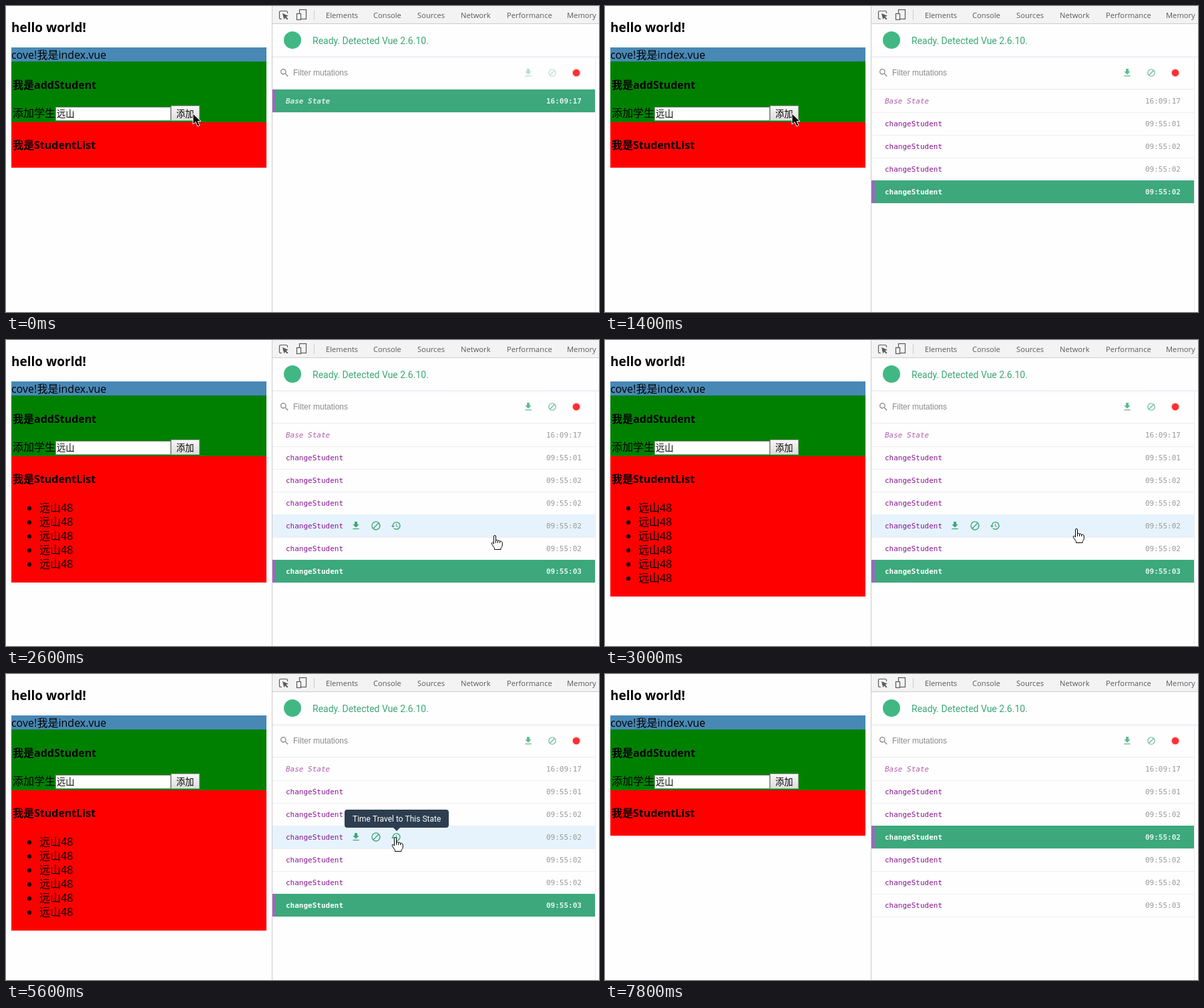
An HTML page with a canvas that plays this animation: 888 px wide and 458 px high, repeating every 8400 ms.

```html
<!DOCTYPE html>
<html lang="zh-CN">
<head>
<meta charset="utf-8">
<title>Mutation log</title>
<style>
html, body { margin: 0; width: 100%; height: 100%; overflow: hidden; background: #fefefe; }
canvas { display: block; }
</style>
</head>
<body>
<canvas id="stage" width="888" height="458"></canvas>
<script>
const ctx = document.getElementById('stage').getContext('2d');
const LOOP = 8400, STEP = 200;
const UI = '"Open Sans", "Noto Sans CJK SC", "Noto Sans CJK", sans-serif';
const MONO = '"DejaVu Sans Mono", monospace';
const ROBOTO = 'Roboto, sans-serif';
const GREEN = '#3ba776', ACTIVE = '#3ca87b', GRAY = '#5a5a5a';
const ROW_TOP = 125, ROW_H = 34, ROW_RIGHT = 882, PANEL = 399;
const STUDENT = '远山';

const TIMES = ['16:09:17', '09:55:01', '09:55:02', '09:55:02', '09:55:02', '09:55:02', '09:55:03'];
const COMMITS = [600, 1000, 1200, 1400, 1600, 2200];
const RENDERS = [1600, 2000, 2200, 2400, 2600, 3000];
const TOOLTIP_AT = 4000, TRAVEL_AT = 5800, LEAVE_AT = 6200, HAND_AT = 2400;
const CURSOR = [
  [2200, 280, 161], [2600, 732, 292], [2800, 732, 292], [3200, 680, 272],
  [3600, 597, 253], [4000, 583, 248], [4400, 583, 244]
];

// Material-style glyphs on a 24 unit grid
const ICONS = {
  download: 'M19 9h-4V3H9v6H5l7 7 7-7zM5 18v2h14v-2H5z',
  block: 'M12 2a10 10 0 1 0 0 20 10 10 0 0 0 0-20zM4 12a8 8 0 0 1 12.9-6.31L5.69 16.9A7.9 7.9 0 0 1 4 12zm8 8c-1.85 0-3.55-.63-4.9-1.69L18.31 7.1A8 8 0 0 1 12 20z',
  history: 'M13 3a9 9 0 0 0-9 9H1l3.89 3.89.07.14L9 12H6a7 7 0 1 1 2.06 4.94l-1.42 1.42A9 9 0 1 0 13 3zm-1 5v5l4.28 2.54.72-1.21-3.5-2.08V8H12z',
  search: 'M15.5 14h-.79l-.28-.27A6.47 6.47 0 0 0 16 9.5 6.5 6.5 0 1 0 9.5 16c1.61 0 3.09-.59 4.23-1.57l.27.28v.79l5 4.99L20.49 19zm-6 0a4.5 4.5 0 1 1 0-9 4.5 4.5 0 0 1 0 9z'
};
for (const name in ICONS) ICONS[name] = new Path2D(ICONS[name]);

const ARROW = new Path2D('M0 0V16L4 12.5 7 19 10 17.7 7.2 11.5H12Z');
const HAND = new Path2D('M-1.5 13V2Q-1.5 .5 0 .5T1.5 2V8Q3 6.5 4.5 8.3 6.2 7.2 7.5 9.2 10 8.3 11.3 11V15Q11 18 9 19.5V21.5H-.5V19.5L-4.8 13.2Q-5 11 -3.3 11.2Z');
const FINGERS = new Path2D('M1.5 8V12M4.5 8.3V12M7.5 9.2V12');
const INSPECT = new Path2D('M413 19.5H411.5Q409.5 19.5 409.5 17.5V9.5Q409.5 7.5 411.5 7.5H419.5Q421.5 7.5 421.5 9.5V11');
const POINTER = new Path2D('M414 11L423 14.8 419.4 16.1 422.5 19.3 421 20.6 418 17.5 416.3 20.3Z');

function rect(x, y, w, h, color) {
  ctx.fillStyle = color;
  ctx.fillRect(x, y, w, h);
}

function frame(x, y, w, h, color) {
  ctx.strokeStyle = color;
  ctx.lineWidth = 1;
  ctx.strokeRect(x + .5, y + .5, w - 1, h - 1);
}

function text(str, x, y, font, color = '#000') {
  ctx.font = font;
  ctx.fillStyle = color;
  ctx.fillText(str, x, y);
}

function disc(x, y, r, color) {
  ctx.fillStyle = color;
  ctx.beginPath();
  ctx.arc(x, y, r, 0, Math.PI * 2);
  ctx.fill();
}

function icon(name, x, y, color, size = 16) {
  ctx.save();
  ctx.translate(x - size / 2, y - size / 2);
  ctx.scale(size / 24, size / 24);
  ctx.fillStyle = color;
  ctx.fill(ICONS[name], 'evenodd');
  ctx.restore();
}

const countPast = (list, t) => list.filter(at => t >= at).length;

function cursorAt(t) {
  if (t >= LEAVE_AT) return null;
  const hand = t >= HAND_AT;
  const next = CURSOR.findIndex(key => key[0] > t);
  if (next === 0) return { x: CURSOR[0][1], y: CURSOR[0][2], hand };
  if (next < 0) {
    const [, x, y] = CURSOR[CURSOR.length - 1];
    return { x, y, hand };
  }
  const [t0, x0, y0] = CURSOR[next - 1], [t1, x1, y1] = CURSOR[next];
  const k = (t - t0) / (t1 - t0);
  return { x: Math.round(x0 + (x1 - x0) * k), y: Math.round(y0 + (y1 - y0) * k), hand };
}

function drawPage(items) {
  const body = `16px ${UI}`, bold = `bold 16px ${UI}`, control = `13.33px ${UI}`;
  text('hello world!', 8, 39, `bold 19px ${UI}`);
  rect(8, 62, 382, 21, '#4888b5');
  text('cove!', 8, 79, body);
  text('我是index.vue', 46.5, 79, body);

  rect(8, 83, 382, 91, '#008000');
  text('我是addStudent', 10, 124, bold);
  text('添加学生', 10, 166, body);
  rect(74, 151, 173, 21, '#fff');
  frame(74, 151, 173, 21, '#8a8a8a');
  text(STUDENT, 76, 166, control);
  const face = ctx.createLinearGradient(0, 149, 0, 172);
  face.addColorStop(0, '#f8f8f8');
  face.addColorStop(1, '#dddddd');
  rect(247, 149, 43, 23, face);
  frame(247, 149, 43, 23, '#a0a0a0');
  text('添加', 255, 166, control);

  rect(8, 174, 382, items ? 84 + 21 * items : 68, '#ff0000');
  text('我是StudentList', 10, 214, bold);
  for (let i = 0; i < items; i++) {
    const y = 257 + 21 * i;
    disc(35, y - 5, 3, '#000');
    text(STUDENT + '48', 50, y, body);
  }
}

function drawToolbar() {
  rect(398, 0, 1, 458, '#cacaca');
  rect(PANEL, 0, 489, 27, '#f3f3f3');
  rect(PANEL, 26, 489, 1, '#cccccc');
  rect(461, 6, 1, 15, '#cccccc');
  ctx.strokeStyle = GRAY;
  ctx.lineWidth = 1.2;
  ctx.stroke(INSPECT);
  ctx.fillStyle = GRAY;
  ctx.fill(POINTER);
  ctx.strokeRect(439.5, 5.5, 10, 14);
  rect(435, 11, 7, 10, '#f3f3f3');
  ctx.strokeRect(435.5, 11.5, 6, 9);
  const tabs = { Elements: 479, Console: 550, Sources: 616, Network: 681, Performance: 750, Memory: 840 };
  for (const name in tabs) text(name, tabs[name], 18, `11.2px ${UI}`, GRAY);
}

function drawHeader(recorded) {
  const shade = ctx.createLinearGradient(0, 74, 0, 79);
  shade.addColorStop(0, '#e6e9ef');
  shade.addColorStop(1, '#fefefe');
  rect(PANEL, 75, 489, 4, shade);
  disc(429, 51, 13, '#41b883');
  text('Ready. Detected Vue 2.6.10.', 459, 57, `14px ${ROBOTO}`, GREEN);

  rect(PANEL, 124, 483, 1, '#ebebeb');
  rect(ROW_RIGHT, 78, 1, 380, '#eeeeee');
  icon('search', 417, 100, '#888888');
  text('Filter mutations', 430, 104, '12px "Liberation Sans", Arial, sans-serif', '#8a8a8a');
  const tint = recorded ? '#62b991' : '#b4dfcc';
  icon('download', 782, 100, tint);
  icon('block', 818, 100, tint, 14);
  disc(854, 100, 7, '#ffe2e2');
  disc(854, 100, 5.3, '#fc3034');
}

function drawRow(i, active, hovered) {
  const y = ROW_TOP + ROW_H * i, base = i === 0;
  if (hovered) rect(PANEL, y, 483, ROW_H, '#e6f3fd');
  rect(PANEL, y + ROW_H, 483, 1, '#eeeeee');
  if (active) {
    rect(PANEL, y, 483, ROW_H, ACTIVE);
    rect(PANEL, y, 5, ROW_H, '#976bbb');
  }
  const weight = active ? 'bold ' : '';
  const nameColor = active ? (base ? '#d8efe5' : '#fff') : (base ? '#b05cab' : '#881391');
  text(base ? 'Base State' : 'changeStudent', 419, y + 21, `${base ? 'italic ' : ''}${weight}11px ${MONO}`, nameColor);
  text(TIMES[i], 809, y + 21, `${weight}11px ${MONO}`, active ? '#e4f4ec' : '#999999');
  if (hovered) {
    ['download', 'block', 'history'].forEach((name, n) =>
      icon(name, 524 + 30 * n, y + 17, active ? '#fff' : GREEN));
  }
}

function drawTooltip() {
  ctx.fillStyle = '#2c3e50';
  ctx.beginPath();
  ctx.roundRect(507, 203, 156, 27, 4);
  ctx.moveTo(580, 230);
  ctx.lineTo(590, 230);
  ctx.lineTo(585, 235);
  ctx.fill();
  text('Time Travel to This State', 519, 221, `12px ${ROBOTO}`, '#fff');
}

function drawCursor({ x, y, hand }) {
  ctx.save();
  ctx.translate(x, y);
  ctx.lineWidth = 1;
  ctx.lineJoin = 'round';
  ctx.fillStyle = hand ? '#fff' : '#000';
  ctx.strokeStyle = hand ? '#000' : '#fff';
  ctx.fill(hand ? HAND : ARROW);
  ctx.stroke(hand ? HAND : ARROW);
  if (hand) ctx.stroke(FINGERS);
  ctx.restore();
}

function draw(t) {
  const travelled = t >= TRAVEL_AT;
  const commits = countPast(COMMITS, t);
  const cursor = cursorAt(t);
  const active = travelled ? 3 : commits;
  const hover = cursor && cursor.hand ? Math.floor((cursor.y - ROW_TOP) / ROW_H) : -1;

  rect(0, 0, 888, 458, '#fefefe');
  drawPage(travelled ? 0 : countPast(RENDERS, t));
  drawToolbar();
  drawHeader(commits > 0);
  for (let i = 0; i <= commits; i++) drawRow(i, i === active, i === hover);
  if (cursor && t >= TOOLTIP_AT) drawTooltip();
  if (cursor) drawCursor(cursor);
}

function tick() {
  draw(Math.floor(performance.now() % LOOP / STEP) * STEP);
  requestAnimationFrame(tick);
}
tick();
</script>
</body>
</html>
```
